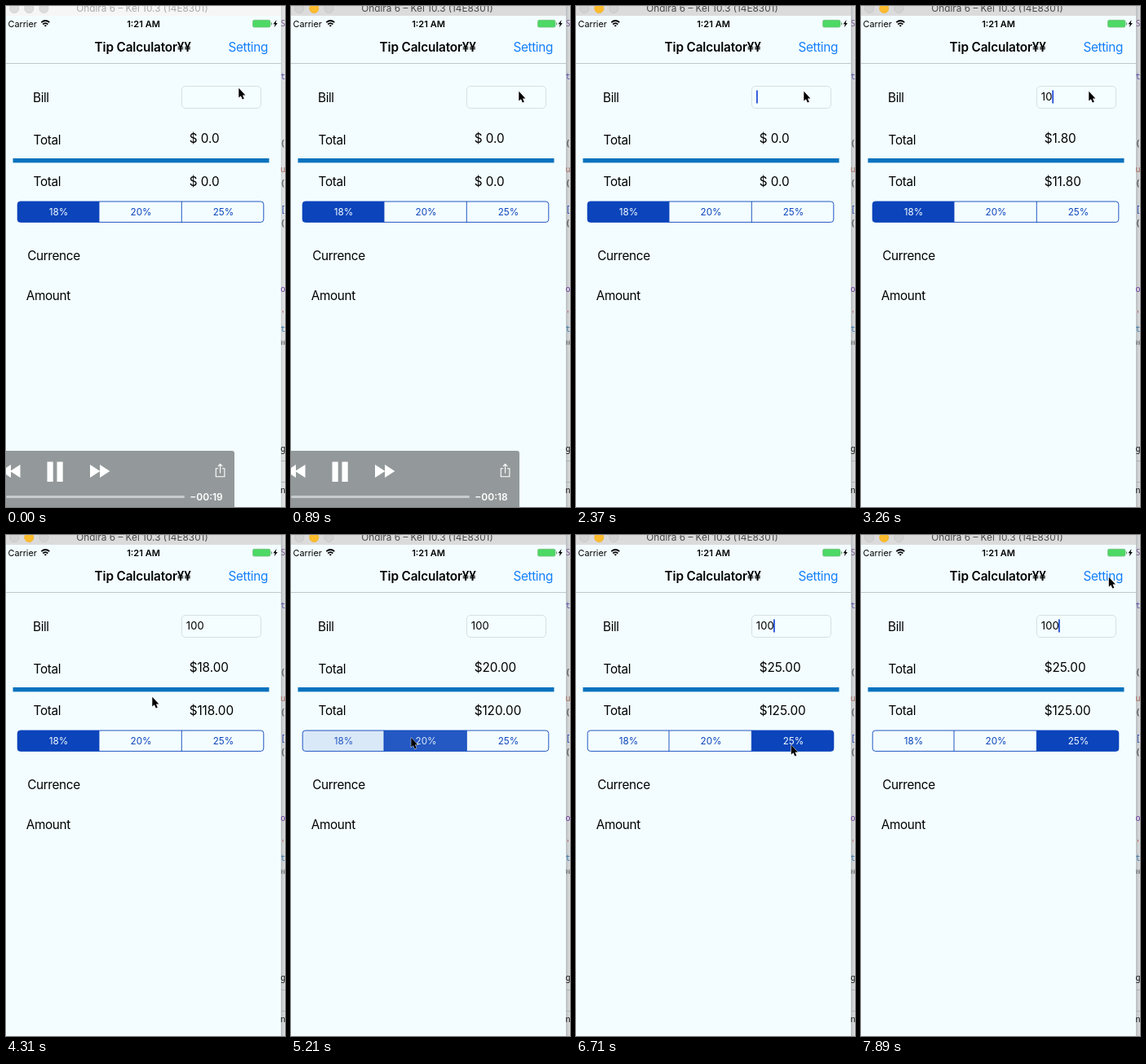
An HTML page that plays this animation: 342x615 px, repeating every 8 s.

```html
<!DOCTYPE html>
<html lang="en">
<head>
<meta charset="utf-8">
<title>Tip Calculator</title>
<style>
html, body { margin: 0; width: 100%; height: 100%; overflow: hidden; background: #f3fdff; }
svg { display: block; width: 342px; height: 615px; font-family: Inter, Roboto, sans-serif; }
.body { font-size: 15.3px; letter-spacing: -.35px; }
.money { font-size: 15.3px; letter-spacing: -.05px; }
.seg { font-size: 11.7px; text-anchor: middle; }
.code { font: 10px "Noto Sans Mono", "DejaVu Sans Mono", monospace; }
</style>
</head>
<body>
<svg viewBox="0 0 342 615">
  <defs>
    <linearGradient id="shade">
      <stop offset="0" stop-color="#b9bdbf"/>
      <stop offset="1" stop-color="#dedfe0"/>
    </linearGradient>
    <clipPath id="pill"><rect x="14" y="240" width="302" height="25.5" rx="3.5"/></clipPath>
  </defs>

  <!-- editor behind the window -->
  <rect x="336" width="6" height="615" fill="#f0f1f2"/>
  <rect id="shadow" x="337" width="5" height="615" fill="url(#shade)"/>
  <g id="code" class="code"></g>
  <path d="M337 558.5h5M337 584.5h5" stroke="#aeb1b3"/>

  <!-- window -->
  <rect width="337" height="615" fill="#f3fdff"/>
  <rect id="bar" width="337" height="12"/>
  <g id="lights" stroke-width=".8">
    <circle cx="10.2" cy="3" r="5.6"/>
    <circle cx="28.3" cy="3" r="5.6"/>
    <circle cx="46.4" cy="3" r="5.6"/>
  </g>
  <text id="caption" x="167" y="7.3" font-size="11.8" text-anchor="middle">Ondira 6 – Kel 10.3 (14E8301)</text>

  <!-- status bar -->
  <text x="2.5" y="25.7" font-size="10.8">Carrier</text>
  <g fill="none" stroke="#000" stroke-width="1.7">
    <path d="M43.3 20.2q5-4.4 10 0M45.2 22.5q3.1-2.6 6.2 0"/>
    <path d="M48.3 25.6l-1.6-1.7q1.6-1.2 3.2 0z" fill="#000" stroke="none"/>
  </g>
  <text x="168.5" y="25.7" font-size="11" font-weight="600" text-anchor="middle">1:21 AM</text>
  <rect x="302.5" y="17.3" width="21.5" height="8.8" rx="1.8" fill="#4cd964" stroke="#79b986" stroke-width=".7"/>
  <path d="M325 20v3.6q1.4-.4 1.4-1.8t-1.4-1.8z" fill="#6aa877"/>
  <path d="M331.6 17l-4 5.3h2.2l-1 4 4-5.3h-2.2z"/>

  <!-- navigation bar -->
  <text x="167.7" y="56" font-size="15.3" font-weight="600" letter-spacing="-.14" text-anchor="middle">Tip Calculator¥¥</text>
  <text class="body" x="272.5" y="56" fill="#147efb">Setting</text>
  <path d="M0 70.5h337" stroke="#b9c3c6" stroke-width=".9"/>

  <!-- form -->
  <g class="body">
    <text x="33" y="117.6">Bill</text>
    <text x="33.6" y="170">Total</text>
    <text x="33.6" y="220.8">Total</text>
    <text x="26.2" y="311.8">Currence</text>
    <text x="24.8" y="361.4">Amount</text>
  </g>
  <rect x="215.5" y="98.5" width="97" height="27" rx="4.5" fill="#f4fdff" stroke="#d3dcdf" stroke-width=".9"/>
  <text id="bill" x="220.7" y="116.4" font-size="13" letter-spacing=".2"></text>
  <rect id="caret" y="103.5" width="1.8" height="16" fill="#2450d6"/>
  <text id="tip" class="money" x="224.7" y="168.2"></text>
  <text id="sum" class="money" x="224.7" y="221.4"></text>
  <rect x="8.5" y="187" width="314" height="5.4" fill="#0672be"/>

  <!-- segmented control -->
  <g id="segs" clip-path="url(#pill)"></g>
  <path d="M114 240v25.5M215.3 240v25.5" stroke="#0b44bb" stroke-width=".9"/>
  <rect x="14.2" y="240" width="301.6" height="25.4" rx="3.5" fill="none" stroke="#0b44bb" stroke-width=".9"/>
  <g id="labels" class="seg"></g>

  <!-- player controls -->
  <g id="player" fill="#fff">
    <path d="M0 546h277q3 0 3 3v66H0z" fill="#93999a"/>
    <path d="M-6 571l12-8v16zM5 571l12.5-8v16z"/>
    <path d="M50.5 559.5h7.2v24.5h-7.2zM62.5 559.5h7.2v24.5h-7.2z"/>
    <path d="M103 563l12.3 8-12.3 8zM115 563l12.3 8-12.3 8z"/>
    <path d="M260.3 567.7h-3v10h10.6v-10h-3M262.6 573.5v-11M259.9 565.2l2.7-2.8 2.7 2.8" fill="none" stroke="#fff" stroke-width="1.1"/>
    <rect x="0" y="601" width="219" height="3" rx="1.5" fill="#c8cccc"/>
    <text id="clock" x="225.3" y="607" font-size="12" font-weight="600"></text>
  </g>

  <path id="pointer" d="M.3 .8V12.6L2.9 10.2L4.8 14.6L6.8 13.7L5 9.5H8.4Z" stroke="#fff" stroke-width="1" paint-order="stroke"/>
</svg>

<script>
const LOOP = 8000, STEP = 148.87;
const $ = id => document.getElementById(id);
const NS = 'http://www.w3.org/2000/svg';
const BLUE = [11, 68, 187], PALE = [243, 253, 255];

function add(parent, tag, attrs, text) {
  const el = document.createElementNS(NS, tag);
  set(el, attrs);
  if (text) el.textContent = text;
  parent.append(el);
  return el;
}
function set(el, attrs) {
  for (const k in attrs) el.setAttribute(k, attrs[k]);
}
const clamp = v => Math.min(1, Math.max(0, v));
const ramp = (t, a, b) => clamp((t - a) / (b - a));
const mix = (a, b, k) => `rgb(${a.map((v, i) => Math.round(v + (b[i] - v) * k))})`;

// visible edge of the code
[['S', 25, '#7a5a94'], ['t', 90, '#5550a8'], ['(', 172, '#222'], ['u', 204, '#a8685c'],
 ['(', 221, '#222'], ['[', 253, '#1d3fa8'], ['(', 270, '#222'], ['o', 351, '#6d3aa0'],
 ["'", 382, '#b8504a'], ['t', 400, '#3b78a8'], ['w', 416, '#777'], ['g', 547, '#111'],
 ['n', 598, '#111']].forEach(([c, y, fill]) => add($('code'), 'text', { x: 336.5, y, fill }, c));

const edges = [14, 114, 215.3, 316];
const segs = ['18%', '20%', '25%'].map((name, i) => ({
  box: add($('segs'), 'rect', { x: edges[i], y: 240, width: edges[i + 1] - edges[i], height: 25.5 }),
  label: add($('labels'), 'text', { x: 64.5 + i * 101, y: 257 }, name)
}));

// pointer stops: time, x, y
const path = [[0, 285, 100], [900, 279, 104], [3860, 279, 104], [4310, 179, 198], [4900, 147, 248],
  [5350, 147, 248], [5960, 263.5, 257], [6850, 263.5, 257], [7590, 303.5, 51], [LOOP, 303.5, 51]];

function pointerAt(t) {
  let i = 1;
  while (i < path.length - 1 && t > path[i][0]) i++;
  const [a, x, y] = path[i - 1], [b, u, v] = path[i];
  const p = ramp(t, a, b), k = p * p * (3 - 2 * p);
  return [x + (u - x) * k, y + (v - y) * k];
}

// typed text: time, digits, caret x
const typed = [[1330, '', 221], [2670, '1', 227], [2970, '10', 234.3], [3560, '100', 242]];

function caretAlpha(age) {
  const p = age % 1000 / 1000;
  return p < .5 ? 1 : Math.max(1 - ramp(p, .5, .62), ramp(p, .9, 1));
}

function draw(t) {
  const active = t >= 880;
  set($('bar'), { fill: active ? '#dcdbdc' : '#f6f6f6' });
  set($('caption'), { fill: active ? '#484848' : '#a9a9a9' });
  set($('shadow'), { opacity: active ? 1 : .6 });
  [...$('lights').children].forEach((c, i) => set(c, active && i === 1
    ? { fill: '#fdbc2e', stroke: '#f0b02c' }
    : { fill: active ? '#d3d2d3' : '#dcdcdc', stroke: active ? '#c5c4c5' : '#cfcfcf' }));

  const entry = typed.filter(e => t >= e[0]).pop();
  const digits = entry ? entry[1] : '';
  $('bill').textContent = digits;
  set($('caret'), { x: entry ? entry[2] : 0, opacity: entry ? caretAlpha(t - entry[0]) : 0 });

  const rate = t < 5050 ? .18 : t < 6400 ? .2 : .25;
  const bill = Number(digits);
  const money = v => bill ? '$' + v.toFixed(2) : '$ 0.0';
  $('tip').textContent = money(bill * rate);
  $('sum').textContent = money(bill * (1 + rate));

  const ease = k => 1 - (1 - k) ** 2;
  const a = ease(ramp(t, 5050, 5290)), b = ease(ramp(t, 6400, 6640));
  [1 - a, a - b, b].forEach((k, i) => {
    set(segs[i].box, { fill: mix(PALE, BLUE, k) });
    set(segs[i].label, { fill: mix(BLUE, PALE, k) });
  });

  set($('player'), { opacity: 1 - ramp(t, 2080, 2370) });
  $('clock').textContent = '−00:' + (t < 740 ? 19 : t < 1730 ? 18 : 17);

  const [x, y] = pointerAt(t);
  set($('pointer'), { transform: `translate(${x.toFixed(1)} ${y.toFixed(1)})` });
}

function tick() {
  const n = Math.floor((performance.now() % LOOP + 20) / STEP);
  draw(n * STEP);
  requestAnimationFrame(tick);
}
tick();
</script>
</body>
</html>
```
